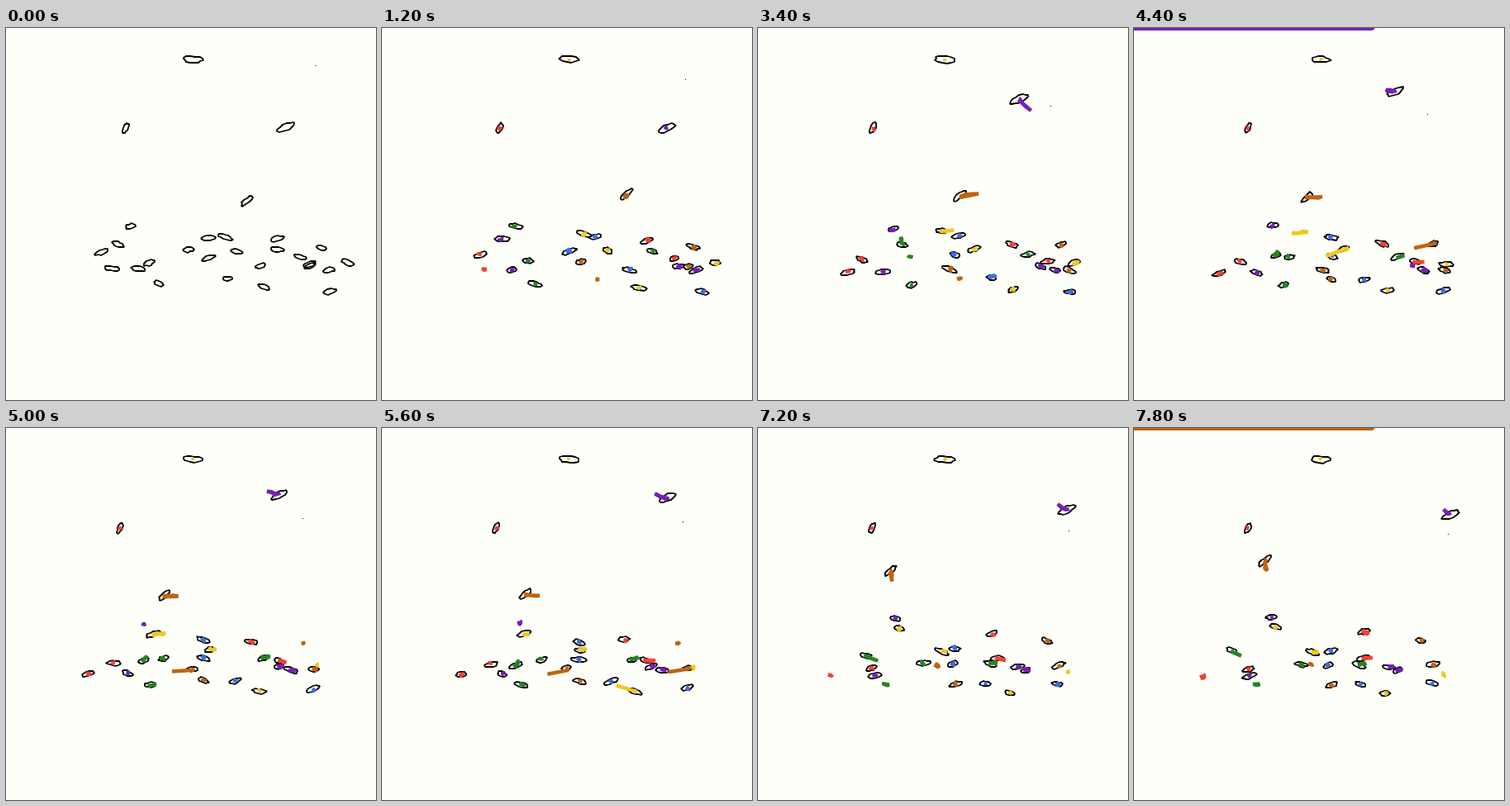
Recreate the animation shown at these times as an HTML page with a canvas. Size 448 by 450 pixels, loop 8 s.

```html
<!DOCTYPE html>
<html lang="en">
<head>
<meta charset="utf-8">
<title>Tracked contours</title>
<style>
  html, body { margin: 0; width: 100%; height: 100%; overflow: hidden; background: #fffffa; }
  canvas { display: block; }
</style>
</head>
<body>
<canvas id="stage" width="448" height="450"></canvas>
<script>
const ctx = document.getElementById('stage').getContext('2d');
const LOOP = 8000, STEP = 200, LAST = LOOP / STEP - 1;
const RED = '#f84030', PURPLE = '#7820b4', GREEN = '#248422',
      YELLOW = '#f0c820', BLUE = '#446ce0', BROWN = '#c06410';

const noise = (a, b = 0) => {
  const s = Math.sin(a * 12.9898 + b * 78.233) * 43758.5453;
  return s - Math.floor(s);
};
const mix = (a, b, t) => a + (b - a) * t;

// Way-points are spread evenly over the loop.
function along(points, step) {
  const at = Math.max(0, step) / LAST * (points.length - 1);
  const i = Math.min(Math.floor(at), points.length - 1);
  const [x, y] = points[i], [nx, ny] = points[i + 1] ?? points[i];
  return [mix(x, nx, at - i), mix(y, ny, at - i)];
}

const blobs = [];
const blob = (color, ...points) => {
  const b = { color, points, seed: blobs.length + 1 };
  blobs.push(b);
  return b;
};
const fixed = (b, length, angle) => Object.assign(b, { length, angle });

fixed(blob(YELLOW, [226, 38]), 12, 4);
fixed(blob(RED, [145, 121], [138, 121], [138, 121]), 7, -65);
fixed(blob(PURPLE, [339, 120], [350, 122], [304, 74], [352, 86], [383, 105]), 11, -25);
fixed(blob(BROWN, [292, 209], [299, 196], [225, 206], [166, 200], [158, 161]), 9, -40);

blob(GREEN, [151, 240], [170, 240], [176, 270], [160, 290], [118, 269]);
blob(PURPLE, [136, 262], [168, 240], [166, 229]);
blob(RED, [116, 271], [139, 292]);
blob(RED, [129, 291], [83, 301]);
blob(PURPLE, [160, 291], [140, 300]);
blob(GREEN, [173, 284], [186, 276], [203, 286]);
blob(GREEN, [185, 309], [186, 311], [146, 310]);
blob(BLUE, [221, 268], [241, 275], [235, 287]);
blob(YELLOW, [245, 254], [244, 243], [172, 250], [171, 240]);
blob(BLUE, [266, 253], [239, 251], [238, 270]);
blob(BROWN, [245, 278], [230, 294], [214, 286]);
blob(YELLOW, [279, 270], [259, 267], [216, 271]);
blob(BROWN, [268, 303], [239, 303], [239, 311]);
blob(BLUE, [308, 288], [279, 304], [274, 310]);
blob(YELLOW, [312, 313], [304, 321]);
blob(RED, [328, 255], [304, 263], [279, 246]);
blob(GREEN, [328, 268], [326, 275], [273, 287]);
blob(RED, [356, 277], [350, 283], [278, 278]);
blob(PURPLE, [368, 288], [309, 289]);
blob(BROWN, [382, 266], [347, 257]);
blob(PURPLE, [391, 293], [319, 293]);
blob(BLUE, [392, 319], [376, 319], [360, 308]);
blob(YELLOW, [414, 284], [378, 284], [375, 299]);
blob(BROWN, [368, 286], [378, 294], [361, 286]);

const speck = [[374, 45], [351, 101], [380, 128]];
const bars = { 11: BROWN, 16: PURPLE, 22: PURPLE, 26: YELLOW, 33: YELLOW, 39: BROWN };

// A detected centre shakes a little around the path.
function centre({ points, seed }, step) {
  const [x, y] = along(points, step);
  return [x + 3 * noise(seed, step) - 1.5, y + 3 * noise(seed + 50, step) - 1.5];
}

function heading({ angle, seed }, step) {
  const sway = 22 * Math.sin(step * 0.2 + seed * 2.4);
  return (angle ?? sway) * Math.PI / 180;
}

const isLost = ({ length, seed }, step) =>
  !length && step > 0 && noise(seed + 100, Math.floor(step / 6)) < 0.12;

function drawOutline(b, step) {
  const [x, y] = along(b.points, step);
  const length = b.length ?? 7.5 + 1.5 * Math.sin(step * 0.3 + b.seed);
  const rad = heading(b, step), c = Math.cos(rad), s = Math.sin(rad);
  const half = length > 10 ? 4 : 3;
  ctx.beginPath();
  for (let k = 0; k < 14; k++) {
    const turn = k * Math.PI / 7, rough = 0.8 + 0.35 * noise(b.seed + k, step);
    const u = Math.cos(turn) * length * rough, v = Math.sin(turn) * half * rough;
    ctx.lineTo(Math.round(x + u * c - v * s), Math.round(y + u * s + v * c));
  }
  ctx.closePath();
  ctx.strokeStyle = '#000';
  ctx.lineWidth = 1.8;
  ctx.stroke();
}

function drawTrail(b, step) {
  const [x, y] = centre(b, step), rad = heading(b, step);
  // Now and then a centre jumps, leaving a long streak.
  const jumped = !b.length && noise(b.seed + 200, step) < 0.05;
  const tail = jumped ? 24 : 2;
  ctx.beginPath();
  ctx.moveTo(x - tail * Math.cos(rad), y - tail * Math.sin(rad));
  for (let back = 3; back >= 0; back--) ctx.lineTo(...centre(b, step - back));
  ctx.lineTo(x + 2 * Math.cos(rad), y + 2 * Math.sin(rad));
  ctx.strokeStyle = b.color;
  ctx.lineWidth = b.length === 12 ? 3 : 4.5;
  ctx.stroke();
}

function drawBar(color) {
  ctx.fillStyle = color;
  ctx.beginPath();
  ctx.moveTo(0, 0);
  ctx.lineTo(292, 0);
  ctx.lineTo(289, 3);
  ctx.lineTo(0, 3);
  ctx.fill();
}

function draw(step) {
  ctx.fillStyle = '#fffffa';
  ctx.fillRect(0, 0, 448, 450);
  ctx.lineJoin = 'bevel';
  for (const b of blobs) if (!isLost(b, step)) drawOutline(b, step);
  if (step > 0) for (const b of blobs) drawTrail(b, step);
  if (bars[step]) drawBar(bars[step]);
  const [x, y] = along(speck, step);
  ctx.fillStyle = '#000';
  ctx.fillRect(Math.round(x), Math.round(y), 1, 1);
}

const start = performance.now();
let shown = -1;
function tick() {
  const step = Math.floor(((performance.now() - start) % LOOP) / STEP);
  if (step !== shown) draw(shown = step);
  requestAnimationFrame(tick);
}
tick();
</script>
</body>
</html>
```
